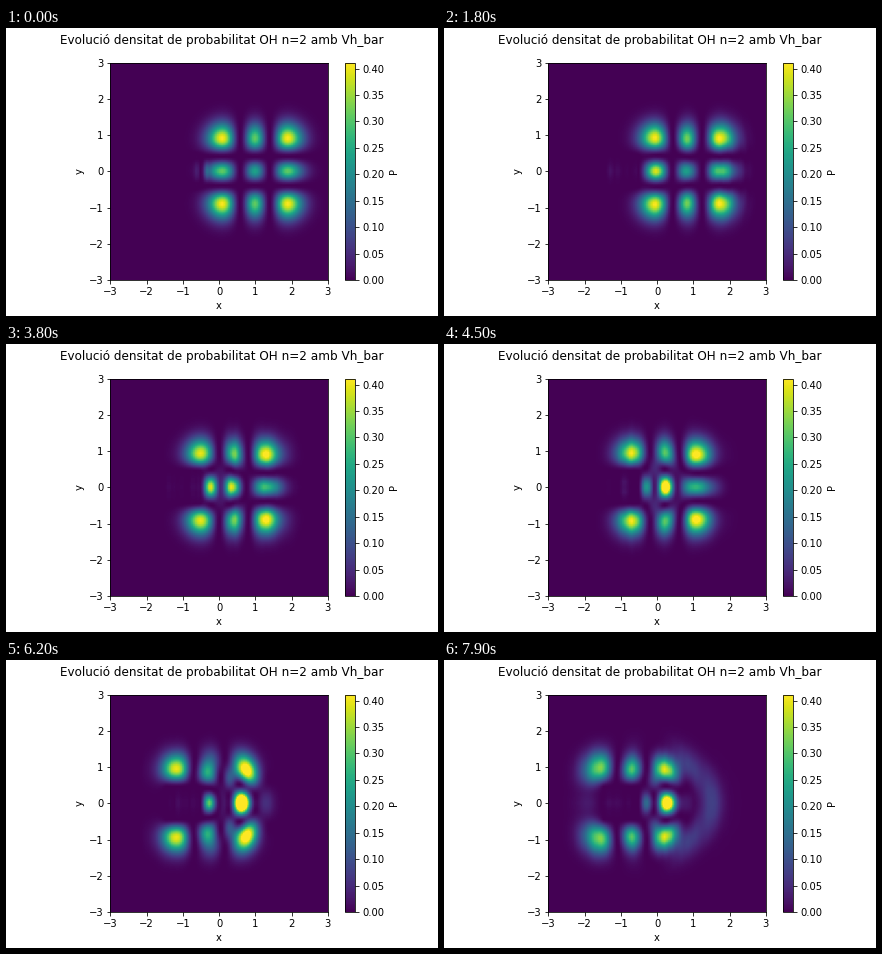
Animation of 432 by 288 pixels, one loop 8000 ms. Source, as a matplotlib script:

```python
import numpy as np
import matplotlib.pyplot as plt
from matplotlib.animation import FuncAnimation

FRAMES, INTERVAL = 80, 100
N, L = 100, 3.0
OMEGA = 3.0            # hbar = m = 1
X0 = 1.0               # initial displacement along x
DT, SUBSTEPS = 0.01, 20
BARRIER = 1000.0

s = np.linspace(-L, L, N)
X, Y = np.meshgrid(s, s)


def phi2(q):
    """Second excited state of the harmonic oscillator."""
    xi = np.sqrt(OMEGA) * q
    norm = (OMEGA / np.pi) ** 0.25 / np.sqrt(8)
    return norm * (4 * xi**2 - 2) * np.exp(-xi**2 / 2)


def propagator(tau):
    """Exact 1D oscillator evolution on the grid."""
    hop = -0.5 / (s[1] - s[0]) ** 2
    h = np.diag(0.5 * OMEGA**2 * s**2 - 2 * hop)
    h += hop * (np.eye(N, k=1) + np.eye(N, k=-1))
    energy, vec = np.linalg.eigh(h)
    return (vec * np.exp(-1j * energy * tau)) @ vec.T


def evolve():
    """Probability density after each time step, by operator splitting."""
    tau = DT / SUBSTEPS
    u = propagator(tau)
    wall = (np.abs(X + 1.0) <= 0.5) & (np.abs(Y) <= 0.5)
    kick = np.exp(-1j * BARRIER * tau * wall)
    psi = phi2(X - X0) * phi2(Y) + 0j
    density = []
    for _ in range(FRAMES):
        for _ in range(SUBSTEPS):
            psi = u @ (kick * psi) @ u
        density.append(np.abs(psi) ** 2)
    return density


density = evolve()

fig, ax = plt.subplots(figsize=(6, 4), dpi=72)
fig.subplots_adjust(left=0.125, right=0.9, bottom=0.125, top=0.88)
fig.suptitle("Evolució densitat de probabilitat OH n=2 amb Vh_bar", fontsize=12)
image = ax.imshow(density[0], origin="lower", extent=(-L, L, -L, L),
                  cmap="viridis", vmin=0, vmax=0.4114)
ax.set_xlabel("x")
ax.set_ylabel("y")
fig.colorbar(image, ax=ax, label="P")


def update(i):
    image.set_data(density[i])
    return (image,)


anim = FuncAnimation(fig, update, frames=FRAMES, interval=INTERVAL,
                     repeat=True, repeat_delay=0)
plt.show()
```
